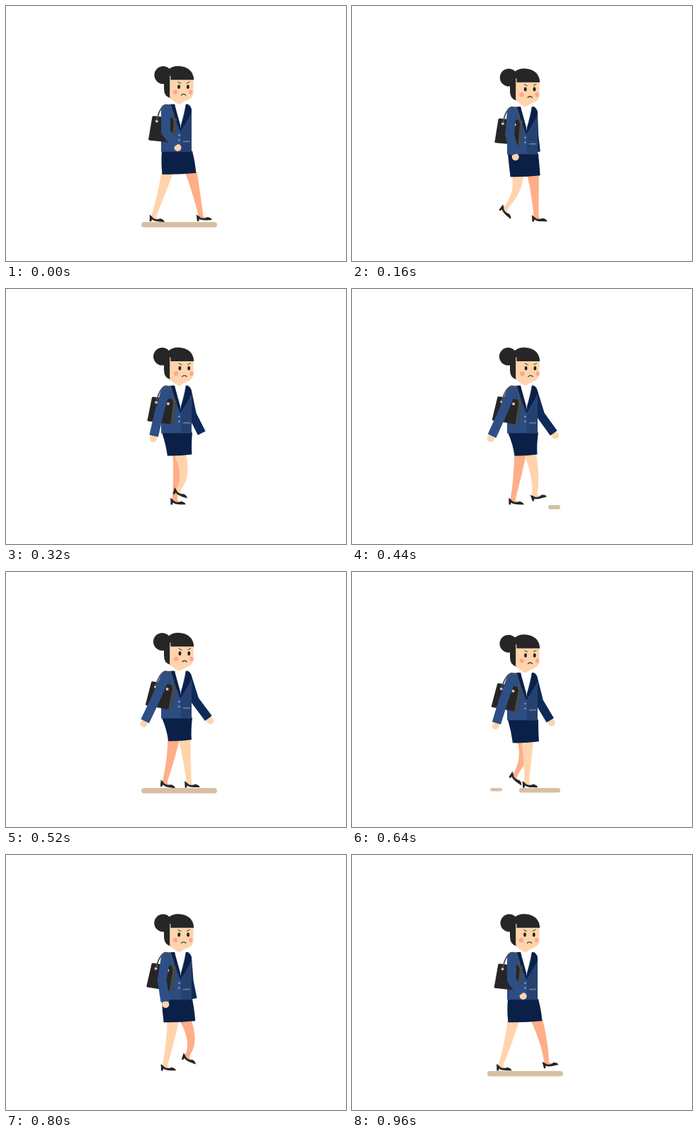
An HTML page with a canvas that plays this animation: 480 by 360 pixels, repeating every 1000 ms.

```html
<!DOCTYPE html>
<html lang="en">
<head>
<meta charset="utf-8">
<title>Walking woman</title>
<style>
html, body { margin: 0; width: 100%; height: 100%; overflow: hidden; background: #fff; }
canvas { display: block; width: 100vw; height: 100vh; }
</style>
</head>
<body>
<canvas id="stage" width="480" height="360"></canvas>
<script>
const g = document.getElementById('stage').getContext('2d');
const LOOP = 1000, STEP = 40;
const BLACK = '#262626', NAVY = '#0a2047', BLUE = '#2c4c82', SLEEVE = '#2d4f86',
      SKIN = '#ffd4ac', FAR_SKIN = '#ffae88', BLUSH = '#ffa590';

// Cosine of the given period with its crest at peak.
const wave = (t, peak = 0, period = LOOP) => Math.cos(2 * Math.PI * (t - peak) / period);

function fill(d, color) {
  g.fillStyle = color;
  g.fill(new Path2D(d));
}
function line(d, color, width) {
  g.strokeStyle = color;
  g.lineWidth = width;
  g.stroke(new Path2D(d));
}
function oval(x, y, rx, ry, color) {
  g.fillStyle = color;
  g.beginPath();
  g.ellipse(x, y, rx, ry, 0, 0, 7);
  g.fill();
}
function shifted(x, y, degrees, draw) {
  g.save();
  g.translate(x, y);
  g.rotate(degrees * Math.PI / 180);
  draw();
  g.restore();
}

// The ground shadow appears with each wide stride and breaks up after it.
function shadow(t) {
  const u = t % 500;
  const bar = (a, b, h) => {
    g.fillStyle = '#d9bfa2';
    g.beginPath();
    g.roundRect(a, 305, b - a, h, h / 2);
    g.fill();
  };
  if (u <= 100 || u >= 460) bar(191, 298, 7.5);
  else if (u <= 140) { bar(195, 212, 4.5); bar(236, 294, 6.5); }
  else if (u >= 420) bar(277, 294, 6);
}

// Foot pitch: heel off, swing, toe up, flat.
const pitchKeys = [[0, 4], [160, 40], [320, 19], [440, -17], [520, 0], [LOOP, 2]];
function pitch(t) {
  const i = pitchKeys.findIndex(k => k[0] > t);
  const [t0, a] = pitchKeys[i - 1], [t1, b] = pitchKeys[i];
  return a + (b - a) * (t - t0) / (t1 - t0);
}

// Both legs share one gait, swinging in the first half of the phase.
function leg(phase, hipShift, footShift, bob, color) {
  const t = phase % LOOP;
  const lift = Math.max(0, 14 * wave(t, 260));
  const hx = 240 + hipShift - 12 * wave(t);
  const ax = 232.5 + footShift - 25 * wave(t) + 2 * wave(t, 430, 500);
  const ay = 296 - lift, top = 234 + bob;
  const kx = (hx + ax) / 2 + 0.5 + 0.45 * lift, ky = 266 - 0.4 * lift;
  const cx = 2 * kx - (hx + ax) / 2, cy = 2 * ky - (top + ay) / 2;
  fill(`M${hx - 8.5} ${top}Q${cx - 5} ${cy} ${ax - 3.5} ${ay}V${ay + 2}H${ax + 3.5}V${ay}` +
    `Q${cx + 5} ${cy} ${hx + 8.5} ${top}Z`, color);
  shifted(ax, ay, pitch(t), () => {
    fill('M-3 -2H3L4 3 12 5 8 7 -2 4Z', color);
    fill('M-6 -1Q-3 1 0 4 6 6 9 3.5 15 4.5 15.5 8H8Q1 8 -2.5 5.5L-3 8.5H-5.5Z', BLACK);
  });
}

function arm(sx, sy, ex, ey, wx, wy, width, color, hand) {
  const len = Math.hypot(wx - ex, wy - ey);
  if (hand) oval(wx + (wx - ex) / len * 4, wy + (wy - ey) / len * 4, 5, 5, SKIN);
  oval(sx, sy, width / 2, width / 2, color);
  g.lineJoin = 'round';
  line(`M${sx} ${sy}L${ex} ${ey} ${wx} ${wy}`, color, width);
}
// The forearm rises as the near arm comes forward.
const raise = t => Math.max(0, wave(t)) ** 2;
function nearArm(t) {
  arm(225.5, 145.5, 218.5 + 7 * wave(t, 10), 178,
    218 + 22 * wave(t), 210 - 13 * raise(t), 12.8, SLEEVE, true);
}
function farArm(t) {
  const wx = 269 - 17 * wave(t);
  arm(256, 147, 260.5 - 6 * wave(t), 180, wx, 206 - 10 * raise(t), 12, '#0e2a58', wx > 277);
}

function skirt(t) {
  const left = 225 + 4.5 * wave(t, 460), right = 265 - 3.5 * wave(t, 440);
  fill(`M220 205H263Q${right - 1} 222 ${right} 236Q${(left + right) / 2} 238.5 ${left} 238` +
    `Q${left - 2} 222 220 205Z`, NAVY);
}

function jacket() {
  fill('M219 206V150Q220 139 232 139H256Q262 141 262 150V206Z', BLUE);
  fill('M247 170L262 146V206H247Z', '#264170');
  fill('M238 138H254L252 148 246 173 240 155Z', '#fff');
  fill('M233 139H238L246 168V178L238 156Z', NAVY);
  fill('M254 139H257Q262 142 262 150L258 158 246 178 247 168Q253 154 254 139Z', NAVY);
  line('M250 191.5H260', '#71839a', 1.5);
  for (const y of [182.5, 189.5]) oval(244.5, y, 1.2, 1.2, '#9aa5b5');
}

function bag() {
  fill('M-16 16H15Q17 16 17 18V49Q17 51 15 51H-18Q-21 51 -20 48L-18 18Q-18 16 -16 16Z', BLACK);
  fill('M13 16H15Q17 16 17 18V49Q17 51 15 51H13Z', '#484a4a');
  for (const x of [-11, 6]) oval(x, 23, 2, 2, '#f5bda2');
}
const strap = () => line('M-11 22C-8 -9 9 -9 13 20', '#4c5155', 1.8);

// Turn moves the bun back and the features forward.
function head(turn) {
  oval(222 - turn, 97.8, 12.5, 12.5, BLACK);
  fill('M231 100H264.5V122Q264.5 130 256 133L250 136Q245 141 240 137L231 130Z', SKIN);
  fill('M223 104Q226 85 243 85 264 86 265.3 104.5H231.8V130Q223 128 223 117Z', BLACK);
  line('M231.8 99V129', SKIN, 1.2);
  shifted(turn, 0, 0, () => {
    oval(238.8, 122, 3.2, 3.2, BLUSH);
    oval(260.5, 122, 2.6, 3.2, BLUSH);
    for (const x of [244, 256.8]) oval(x, 114.3, 1.9, 2.9, '#222');
    line('M242.3 107.3L247 109.6M259.5 107L255 109.4', BLACK, 0.9);
    line('M247 126.5Q250.5 122.5 254 126.5', BLACK, 1.1);
  });
}

function draw(t) {
  const bob = 3.4 * wave(t, 130, 500), tilt = 8 - 3 * wave(t, 100);
  g.fillStyle = '#fff';
  g.fillRect(0, 0, 480, 360);
  shadow(t);
  shifted(0, bob, 0, () => farArm(t));
  leg(t + LOOP / 2, 9, 16, bob, FAR_SKIN);
  leg(t, 0, 0, bob, SKIN);
  shifted(0, bob, 0, () => {
    skirt(t);
    jacket();
    shifted(226, 141, tilt, bag);
    nearArm(t);
    shifted(226, 141, tilt, strap);
    head(0.8 - 0.8 * wave(t, -70));
  });
}

const start = performance.now();
function tick() {
  const t = (performance.now() - start) % LOOP;
  draw(Math.floor(t / STEP) * STEP);
  requestAnimationFrame(tick);
}
tick();
</script>
</body>
</html>
```
